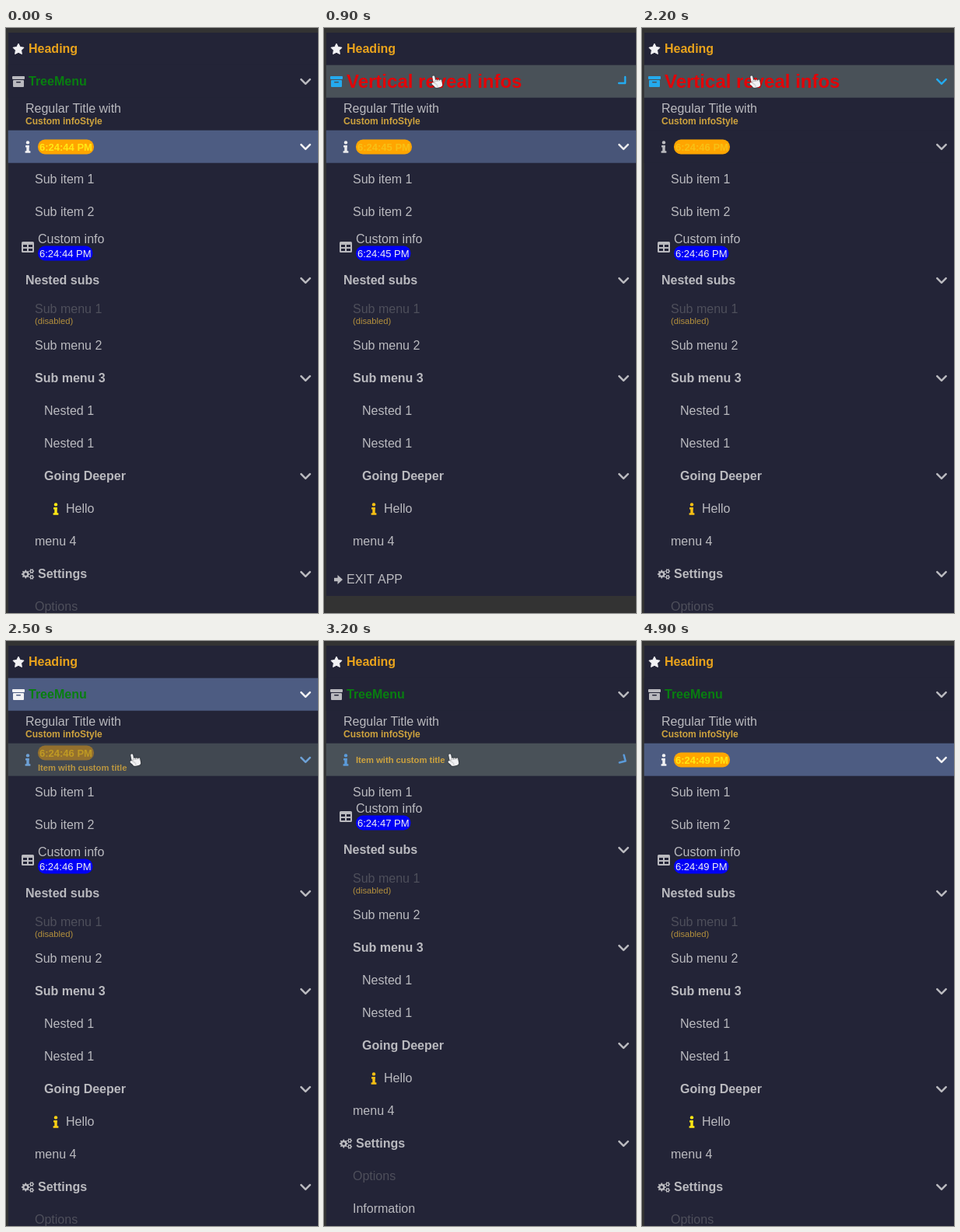
Recreate the animation shown at these times as an HTML page with a canvas. Size 401x753 px, loop 5.1 s.

```html
<!DOCTYPE html>
<html lang="en">
<head>
<meta charset="utf-8">
<title>Tree menu</title>
<style>
html, body { margin: 0; width: 100%; height: 100%; overflow: hidden; background: #333; }
canvas { display: block; width: 401px; height: 753px; }
</style>
</head>
<body>
<canvas id="stage" width="401" height="753"></canvas>
<script>
const ctx = document.getElementById('stage').getContext('2d');
const W = 401, H = 753, LOOP = 5100, STEP = 100;
const ROW = 42, TREE_TOP = 90, TREE_HEIGHT = 857;
const FONT = '"Liberation Sans", Arial, sans-serif';

const PAGE = [51, 51, 51], PANEL = [35, 36, 55], ACTIVE = [77, 92, 130], HOVER = [73, 81, 88];
const GREY = [186, 186, 191], WHITE = [242, 242, 244], DIM = [78, 79, 91];
const CYAN = [36, 170, 238], SKY = [91, 155, 218], GOLD = [206, 163, 62];
const ORANGE = [233, 163, 28], GREEN = [8, 126, 16], RED = [226, 4, 8];
const YELLOW = [255, 232, 20], AMBER = [248, 192, 20], BADGE = [255, 165, 0], BLUE = [0, 0, 245];

const rgb = c => `rgb(${c.map(Math.round).join(',')})`;
const mix = (a, b, k) => a.map((v, i) => v + (b[i] - v) * k);
const ramp = (t, start, length) => Math.min(1, Math.max(0, (t - start) / length));
const easeIn = k => k ** 1.73;
const easeOut = k => 1 - (1 - k) ** 2.4;

function cursorAt(t) {
  if (t < 100 || t >= 4000) return null;
  let p = mix([372, 260], [144, 69], ramp(t, 100, 400));
  p = mix(p, [165, 153], ramp(t, 2200, 300));
  return mix(p, [346, 876], ramp(t, 3400, 600));
}

function stateAt(t) {
  const closed = ramp(t, 700, 400), opened = easeOut(ramp(t, 1600, 400));
  const subFold = ramp(t, 2500, 300) - ramp(t, 3100, 300);
  const treeHover = ramp(t, 200, 400) - ramp(t, 2300, 200);
  const itemReveal = ramp(t, 2200, 700) - ramp(t, 3400, 400);
  const warm = Math.min(1, Math.max(treeHover, itemReveal * 1.4));
  return {
    clock: `6:24:${44 + Math.floor((t + 200) / 1000)} PM`,
    treeHeight: TREE_HEIGHT * (1 - easeIn(closed) + easeIn(opened)),
    treeTurn: opened - closed,
    treeHover,
    treeActive: ramp(t, 800, 300) - ramp(t, 2550, 350),
    subHeight: 2 * ROW * (1 - subFold),
    subTurn: -subFold,
    itemReveal,
    itemHover: ramp(t, 2300, 250) - ramp(t, 3500, 300),
    itemActive: 1 - ramp(t, 870, 230) + ramp(t, 2600, 300),
    accent: mix(YELLOW, AMBER, warm),
    cursor: cursorAt(t)
  };
}

function text(str, x, y, color, size = 16, bold = false) {
  ctx.font = `${bold ? 'bold ' : ''}${size}px ${FONT}`;
  ctx.fillStyle = rgb(color);
  ctx.fillText(str, x, Math.round(y));
}

function box(x, y, w, h, r = 0) {
  ctx.beginPath();
  ctx.roundRect(x, y, w, h, r);
  ctx.fill();
}

function disc(x, y, r) {
  ctx.beginPath();
  ctx.arc(x, y, r, 0, 7);
  ctx.fill();
}

function at(x, y, draw) {
  ctx.save();
  ctx.translate(x, y);
  draw();
  ctx.restore();
}

function faded(alpha, draw) {
  ctx.save();
  ctx.globalAlpha = alpha;
  draw();
  ctx.restore();
}

function clipped(y, h, draw) {
  ctx.save();
  ctx.beginPath();
  ctx.rect(0, y, W, h);
  ctx.clip();
  draw();
  ctx.restore();
}

function chevron(y, color = GREY, turn = 0) {
  at(385, y, () => {
    ctx.rotate(turn * Math.PI / 2);
    ctx.strokeStyle = rgb(color);
    ctx.lineWidth = 2.5;
    ctx.lineCap = ctx.lineJoin = 'round';
    ctx.beginPath();
    ctx.moveTo(-5.7, -2.8);
    ctx.lineTo(0, 2.9);
    ctx.lineTo(5.7, -2.8);
    ctx.stroke();
  });
}

const icons = {
  star() {
    ctx.beginPath();
    for (let i = 0; i < 10; i++) {
      const r = i % 2 ? 3.8 : 7.4, a = i * Math.PI / 5 - Math.PI / 2;
      ctx.lineTo(r * Math.cos(a), r * Math.sin(a) + .5);
    }
    ctx.closePath();
    ctx.fill();
    ctx.lineWidth = 1;
    ctx.lineJoin = 'round';
    ctx.stroke();
  },
  archive(bg) {
    box(-8, -7, 16, 4, 1);
    box(-7, -2, 14, 9, 1);
    ctx.fillStyle = rgb(bg);
    box(-3, 0, 6, 1.4, .7);
  },
  info() {
    disc(0, -5.6, 2.2);
    box(-3, -2, 4.7, 2.6, .4);
    box(-1.7, -2, 3.4, 9, .4);
    box(-3.4, 5.2, 6.8, 2.6, .4);
  },
  table(bg) {
    box(-8, -7, 16, 14, 1.6);
    ctx.fillStyle = rgb(bg);
    for (const x of [-6, 1]) for (const y of [-3, 2]) box(x, y, 5, 3);
  },
  cogs(bg, color) {
    const gear = (x, y, r, teeth) => {
      ctx.fillStyle = rgb(color);
      ctx.beginPath();
      for (let i = 0; i < teeth * 4; i++) {
        const a = (i - .5) / (teeth * 2) * Math.PI, q = i % 4 < 2 ? r : r * .74;
        ctx.lineTo(x + q * Math.cos(a), y + q * Math.sin(a));
      }
      ctx.fill();
      ctx.fillStyle = rgb(bg);
      disc(x, y, r * .34);
    };
    gear(-2.7, 0, 5.5, 8);
    for (const y of [-3.8, 3.8]) gear(5, y, 3.2, 6);
  },
  exit() {
    ctx.lineWidth = 2;
    clipped(-8, 16, () => {
      ctx.beginPath();
      ctx.roundRect(-7, -5, 12, 10, 2);
      ctx.save();
      ctx.clip(new Path2D('M-9-9H-2.5V9H-9Z'));
      ctx.stroke();
      ctx.restore();
    });
    box(-3, -2.2, 5, 4.4);
    ctx.beginPath();
    ctx.moveTo(1.5, -6);
    ctx.lineTo(8, 0);
    ctx.lineTo(1.5, 6);
    ctx.fill();
  }
};

function icon(name, x, y, color, bg = PANEL) {
  at(x, y, () => {
    ctx.fillStyle = ctx.strokeStyle = rgb(color);
    icons[name](bg, color);
  });
}

function pill(str, y, bg, color, bold) {
  ctx.font = `${bold ? 'bold ' : ''}13px ${FONT}`;
  ctx.fillStyle = rgb(bg);
  box(41, y - 9.5, ctx.measureText(str).width + 4, 19, 9);
  text(str, 43, y + 5, color, 13, bold);
}

function rowFill(y, active, hover) {
  const c = mix(mix(PANEL, ACTIVE, active), HOVER, hover);
  ctx.fillStyle = rgb(c);
  ctx.fillRect(2.7, y - .3, W, ROW);
  return c;
}

// Title slides up and fades while the info rises from below.
function reveal(y, r, title, info) {
  const c = y + ROW / 2;
  clipped(y, ROW, () => {
    faded((1 - r) ** 1.5, () => title(c - Math.round(15 * r ** .6)));
    faded(Math.min(1, r * 2), () => info(c + Math.floor(20 * Math.max(0, 1 - 1.15 * r))));
  });
}

function treeRow(s) {
  const y = 48, c = y + ROW / 2;
  const bg = rowFill(y, s.treeActive, s.treeHover);
  const tint = mix(mix(GREY, WHITE, s.treeActive), CYAN, s.treeHover);
  icon('archive', 16, c, tint, bg);
  reveal(y, s.treeHover,
    m => text('TreeMenu', 29, m + 5, GREEN, 16, true),
    m => text('Vertical reveal infos', 29, m + 8, RED, 24, true));
  chevron(c, tint, s.treeTurn);
}

function clockRow(s, y) {
  const c = y + ROW / 2;
  rowFill(y, s.itemActive, s.itemHover);
  const tint = mix(mix(GREY, WHITE, s.itemActive), SKY, s.itemHover);
  icon('info', 28, c, tint);
  reveal(y, s.itemReveal,
    m => pill(s.clock, m, BADGE, s.accent, true),
    m => text('Item with custom title', 41, m + 4, GOLD, 11.2, true));
  chevron(c, tint, s.subTurn);
}

function tree(s) {
  let y = TREE_TOP;
  const row = (label, x, bold = false, color = GREY) => {
    text(label, x, y + 26, color, 16, bold);
    if (bold) chevron(y + 21);
    y += ROW;
  };

  text('Regular Title with', 25, y + 19, GREY);
  text('Custom infoStyle', 25, y + 34, GOLD, 12, true);
  y += ROW;

  clockRow(s, y);
  y += ROW;

  const subEnd = y + Math.round(s.subHeight);
  clipped(y, s.subHeight, () => {
    row('Sub item 1', 37);
    row('Sub item 2', 37);
  });
  y = subEnd;

  icon('table', 28, y + 24, GREY);
  text('Custom info', 41, y + 19, GREY);
  pill(s.clock, y + 32, BLUE, WHITE, false);
  y += 46;

  row('Nested subs', 25, true);
  text('Sub menu 1', 37, y + 21, DIM);
  text('(disabled)', 37, y + 35, mix(PANEL, GOLD, .85), 11.2);
  y += ROW;
  row('Sub menu 2', 37);
  row('Sub menu 3', 37, true);
  row('Nested 1', 49);
  row('Nested 1', 49);
  row('Going Deeper', 49, true);
  icon('info', 64, y + 21, s.accent);
  row('Hello', 77);
  row('menu 4', 37);
  icon('cogs', 28, y + 21, GREY);
  row('Settings', 41, true);
  row('Options', 37, false, DIM);
  row('Information', 37);
  row('Profile', 37);
}

function hand(x, y) {
  at(x, y, () => {
    ctx.rotate(-.2);
    ctx.shadowColor = 'rgba(0,0,0,.5)';
    ctx.shadowBlur = 2;
    ctx.fillStyle = rgb(WHITE);
    box(-3.5, -8, 3, 12, 1.5);
    for (let i = 1; i < 4; i++) box(-3.5 + 2.6 * i, -3 + .6 * i, 3, 8, 1.5);
    box(-3.5, 0, 10.5, 8, 3);
    ctx.rotate(-.7);
    box(-6, -3, 3, 8, 1.5);
  });
}

function draw(t) {
  const s = stateAt(t);
  const bottom = TREE_TOP + Math.round(s.treeHeight);
  ctx.fillStyle = rgb(PAGE);
  ctx.fillRect(0, 0, W, H);
  ctx.fillStyle = rgb(PANEL);
  ctx.fillRect(3, 6, W - 3, bottom + ROW - 6);

  icon('star', 16, 27, WHITE);
  text('Heading', 29, 32, ORANGE, 16, true);
  treeRow(s);
  clipped(TREE_TOP, bottom - TREE_TOP, () => tree(s));

  icon('exit', 16, bottom + 21, GREY);
  text('EXIT APP', 29, bottom + 26, GREY);
  if (s.cursor) hand(...s.cursor);
}

const start = performance.now();
function tick() {
  const t = (performance.now() - start) % LOOP;
  draw(Math.floor(t / STEP) * STEP);
  requestAnimationFrame(tick);
}
tick();
</script>
</body>
</html>
```
